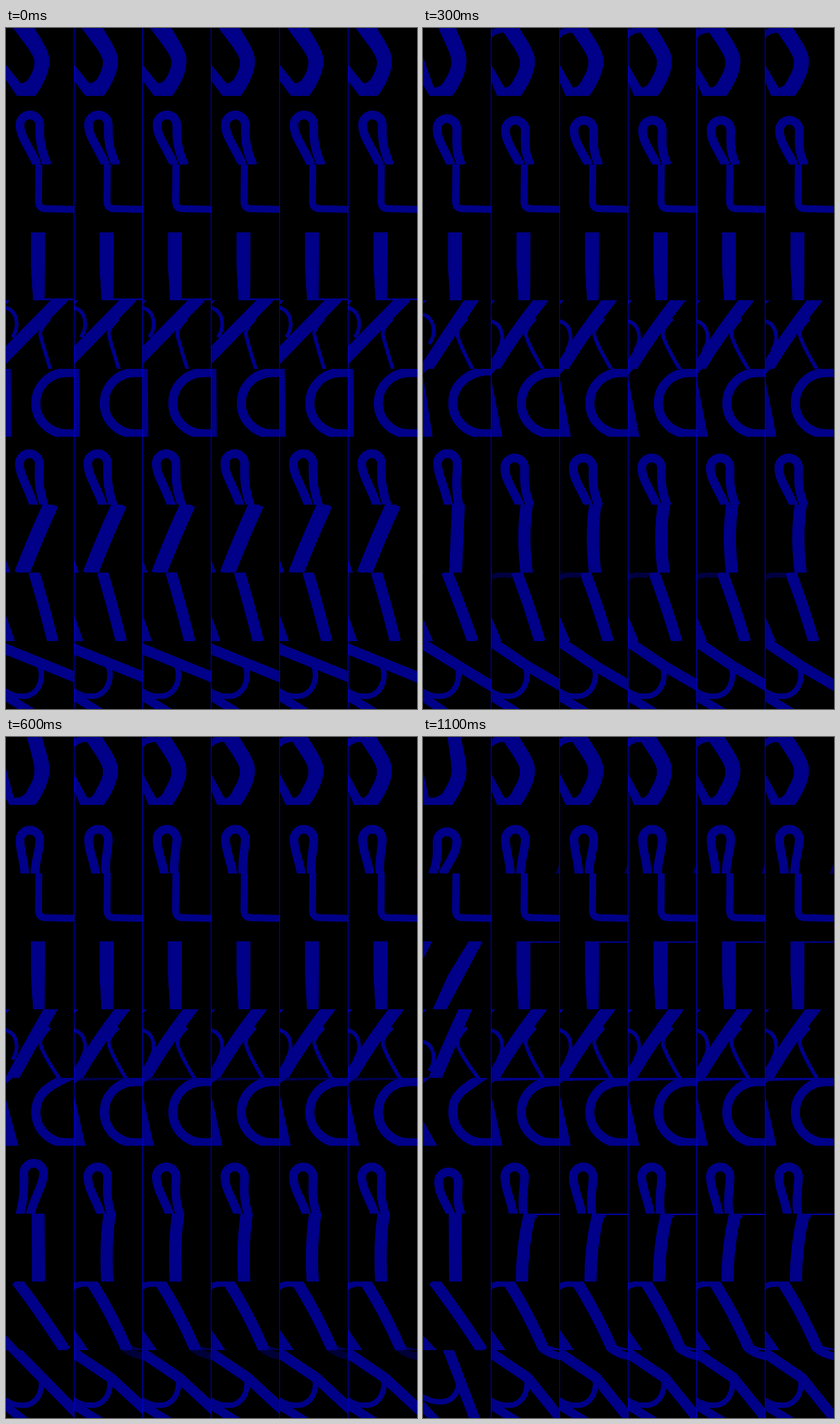
An HTML page with a canvas for the animation above (1.2 s loop, 582 px wide and 963 px high).

```html
<!DOCTYPE html>
<html>
<head>
<meta charset="utf-8">
<style>
html, body { margin: 0; width: 100%; height: 100%; overflow: hidden; background: #000; }
canvas { display: block; }
</style>
</head>
<body>
<canvas id="stage" width="582" height="963"></canvas>
<script>
const ctx = document.getElementById('stage').getContext('2d');
const BODY = '#000088', EDGE = '#0000a8', DIVIDER = '#0000c4';
const COLS = 6, CELL = 97, PITCH = 96.3, STEPS = 12, STEP_MS = 100;

let step = 0;
let first = true; // the left column moves on its own, the others settle early

const clamp = p => Math.max(0, Math.min(1, p));
const ramp = (a, b, from = 0, to = STEPS - 1) => a + (b - a) * clamp((step - from) / (to - from));
const drift = (a, b) => b - (b - a) * (1 - step / (STEPS - 1)) ** 2;
const bump = (at, width) => Math.exp(-(((step - at) / width) ** 2));
const side = (left, rest) => first ? left : rest;
const turn = (a, left, rest) => side(drift(a, left), ramp(a, rest, 0, 3));

const line = (d, w, alpha = 1) => ({ path: new Path2D(d), w, alpha });
const area = d => ({ path: new Path2D(d), w: 0, alpha: 1 });
const others = (...shapes) => first ? [] : shapes;

// Loop with its head at x, y and two close legs around foot on the lower edge
function pin(x, y, foot) {
  const r = 14, neck = x + (foot - x) / 3;
  return line(`M${foot - 7.2} 98 C${neck - 8} ${y + 29} ${x - r} ${y + 16} ${x - r} ${y}
    A${r} ${r} 0 0 1 ${x + r} ${y}
    C${x + r} ${y + 16} ${neck + 7} ${y + 29} ${foot + 7.2} 98`, 12);
}

const rows = [
  // Bent hook
  () => {
    const inner = turn(10, 35, 13), outer = turn(39, 53, 38);
    const left = side(ramp(52, 38, 0, 2) + ramp(0, 8, 2, 8), 52);
    const tip = turn(21, 8, 18), floor = ramp(79, 87, 0, 4);
    return [
      area(`M${outer} -1 C${(outer + 58) / 2} 16 61 32 61 47 C61 66 47 88 40 97
        H${turn(17, 3, 9)} L-1 ${side(ramp(71, 95), 73)} V${left} L${tip} ${floor}
        Q27 ${floor} 32 73 Q41 59 41 48 C41 38 ${(inner + 42) / 2} 21 ${inner} -1 Z`),
      ...others(line('M-3 11 Q4 3 18 2', 9, ramp(0, 1, 1, 4)))
    ];
  },

  () => [
    pin(33.8, turn(41, 52, 48.5), side(ramp(51.7, 20.5, 2, 9), ramp(51.7, 34, 2, 7))),
    ...others(line('M99 82 L93 98', 5, ramp(0, 0.4, 8)))
  ],

  () => [line('M46.5 -2 L46 52 Q46 62.5 56 62.5 L99 63.5', 9.5)],

  // Post that tips over in the left column
  () => {
    const lean = side(ramp(0, 1, 7.4), 0), corner = 16 * lean - 3;
    return [
      area(`M${36 + 30 * lean} -1 h18.5 L${54 - 22 * lean} 97 H${39 - 25 * lean} L36 48 Z`),
      area(`M-2 -1 H${corner} L-2 ${2 * corner + 2} Z`),
      line('M52 95.5 H98', 4, ramp(1, 0, 0, 2)),
      ...others(line('M54 1 H98', 2, ramp(0, 0.8, 10)))
    ];
  },

  // Crossing strokes
  () => {
    const top = side(drift(77, 58), ramp(77, 67.5, 0, 4));
    const foot = side(ramp(-21, 4, 0, 3) + ramp(0, 14, 3), ramp(-21, 2, 0, 3));
    const arc = side(ramp(10, 45), ramp(10, 29, 0, 3));
    return [
      line(`M${top + 4} -5 Q${(top + foot) / 2 + turn(0, 0, -5)} 48 ${foot - 3} 102`, 17.5),
      line(`M-2 ${arc} Q14 ${arc + 4} 15 ${arc + 22} Q16 ${arc + 32} 9 ${arc + 42}`, 5),
      line(`M62 26 Q46 42 49 50 Q52 63 ${turn(63, 79, 73)} 98`, 5),
      area('M-1 -1 H6 L-1 6 Z')
    ];
  },

  // Open ring, pinched at the top in the left column
  () => {
    const pinch = side(ramp(0, 1, 2, 10), 0), end = 5.2 - 17 * pinch;
    const wedge = side(ramp(-1, 60, 2, 10), ramp(-1, 24, 0, 5));
    return [
      area(`M-1 ${wedge} H${ramp(6, -1, 0, 3)} L${turn(7, 20, 15)} 97 H-1 Z`),
      line(`M99 91.8 H85.5 A43.3 43.3 0 0 1 42.2 48.5
        C42.2 24.6 ${61.5 - 9 * pinch} ${5.2 + 13 * pinch} ${85.5 + 14 * pinch} ${end} H101`, 12.5),
      area(`M-1 -1 H${ramp(-1, 10, 0, 4)} L-1 8 Z`),
      ...others(line('M-1 3 Q14 1 98 1', 4, ramp(0, 1, 5, 8)))
    ];
  },

  () => {
    const sway = bump(5.5, 1.8);
    return [first
      ? pin(ramp(33, 36) + 5 * sway, ramp(38, 51, 5, 10) - 2 * sway, 47 - 22 * sway)
      : pin(32.8, ramp(38, 44, 0, 2), ramp(48, 38.5, 4))];
  },

  // Slanted post that straightens
  () => {
    const top = ramp(64, 45.5, 0, 4) + side(0, ramp(0, 9, 4, 8));
    const foot = side(ramp(22, 46, 0, 3), ramp(22, 50, 0, 3) + ramp(0, -7, 4, 8));
    const flare = ramp(0, 1, 6);
    return [
      line(`M${top} -1 Q${side((top + foot) / 2, 43)} 44 ${foot} 98`, ramp(21, side(18, 17), 0, 2)),
      area(`M-1 ${ramp(78, 97, 0, 4)} L${ramp(6, -1, 0, 4)} 97 H-1 Z`),
      ...others(line('M52 10 Q56 3 64 2', 6, flare), line('M54 1 H98', 2, flare))
    ];
  },

  () => {
    const top = ramp(39.5, side(15, 23), 2, 6), foot = ramp(66.5, side(84, 75), 2, 6);
    return [
      line(`M${top} -1 Q${(top + foot) / 2 + side(0, ramp(0, 3, 2, 6))} 44 ${foot} 98`, 15.5),
      area(`M-1 ${ramp(60, side(76, 68), 2, 6)} L${ramp(12, 19, 2, 6)} 97 H-1 Z`),
      ...others(
        line('M-2 8 Q8 1 28 4', 8, ramp(0, 1, 2, 6)),
        line('M74 92 Q84 97 99 99', 7, ramp(0, 1, 5, 8)))
    ];
  },

  // Bar turning about a pivot, with a bow under it; elsewhere only its right half turns
  () => {
    const x = 51, y = ramp(32, 39, 0, 6);
    const left = side(ramp(22, 69, 1), ramp(22, 34, 0, 3));
    const right = side(left, ramp(22, 51, 1, 8));
    const reach = (deg, r) => {
      const a = deg * Math.PI / 180;
      return `${x + r * Math.cos(a)} ${y + r * Math.sin(a)}`;
    };
    const bow = side(ramp(78, 73, 6), 78);
    return [
      line(`M${reach(left, -90)} L${x} ${y} L${reach(right, 90)}`, 14.5),
      line(`M45 30 C58 50 46 ${bow + 2} 22 ${bow} Q10 ${bow} -2 ${bow - 8}`, 7.5),
      line(`M-4 76 L${side(ramp(42, 22), 42)} 104`, 12),
      ...others(line('M70 -4 Q82 7 99 9', 11, ramp(0, 0.85, 5, 9)))
    ];
  }
];

function paint(shapes) {
  for (const color of [EDGE, BODY]) {
    ctx.fillStyle = ctx.strokeStyle = color;
    for (const { path, w, alpha } of shapes) {
      ctx.globalAlpha = alpha;
      if (w) {
        ctx.lineWidth = color === EDGE ? w : w - 1.4;
        ctx.stroke(path);
      } else {
        ctx.fill(path);
        ctx.lineWidth = 1;
        if (color === EDGE) ctx.stroke(path);
      }
    }
  }
  ctx.globalAlpha = 1;
}

function draw() {
  ctx.fillStyle = '#000';
  ctx.fillRect(0, 0, 582, 963);
  rows.forEach((make, r) => {
    const y = Math.round(r * PITCH), h = Math.round((r + 1) * PITCH) - y;
    for (let c = 0; c < COLS; c++) {
      first = c === 0;
      ctx.save();
      ctx.translate(c * CELL, y);
      ctx.beginPath();
      ctx.rect(0, 0, CELL, h);
      ctx.clip();
      paint(make());
      ctx.restore();
    }
  });
  ctx.fillStyle = DIVIDER;
  for (let c = 1; c < COLS; c++) ctx.fillRect(c * CELL - 1, 0, 1, 963);
}

const start = performance.now();
let shown = -1;
function tick() {
  step = Math.floor((performance.now() - start) / STEP_MS) % STEPS;
  if (step !== shown) {
    shown = step;
    draw();
  }
  requestAnimationFrame(tick);
}
tick();
</script>
</body>
</html>
```
